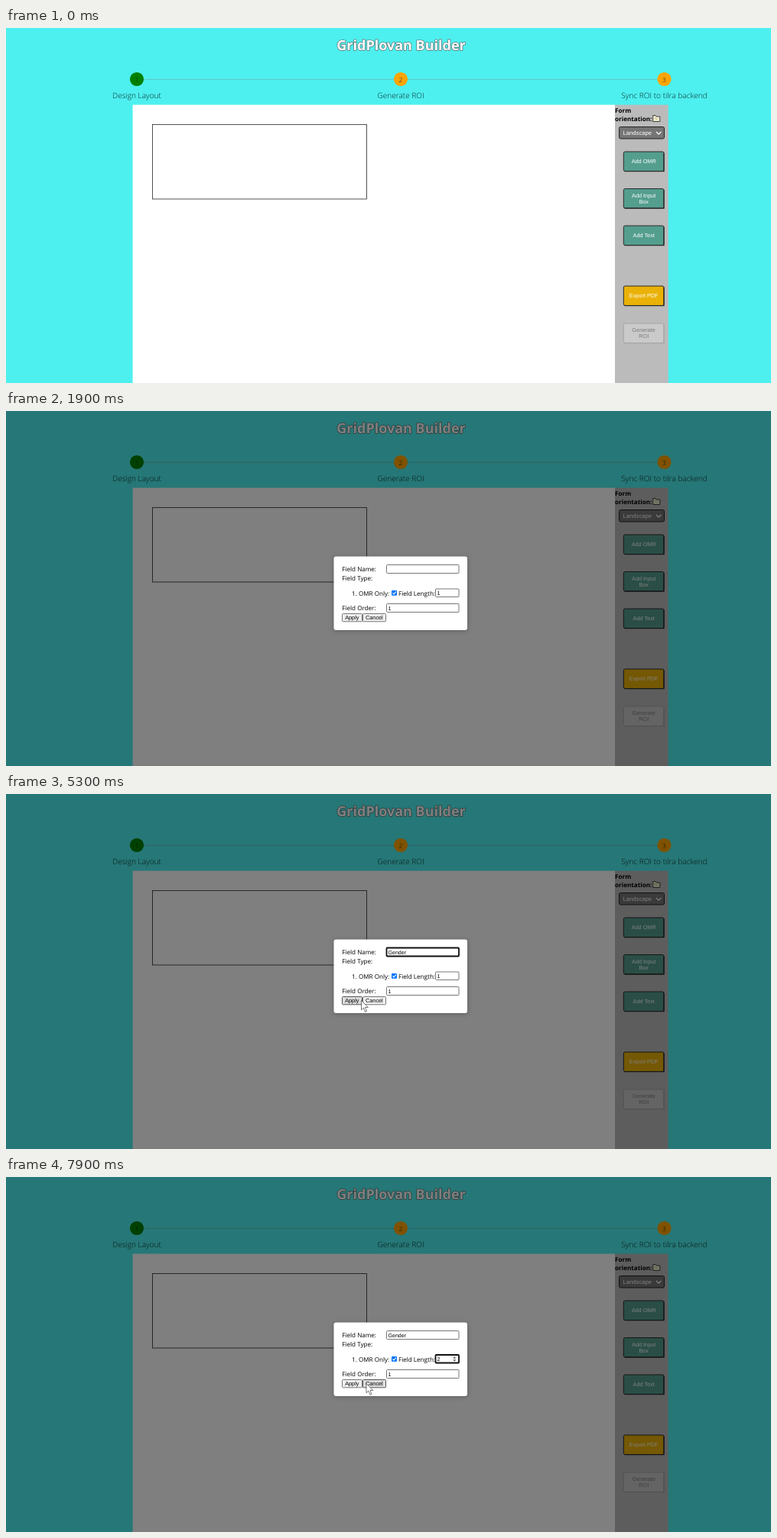
An HTML page for the animation above (8000 ms loop, 1000 by 465 pixels).

```html
<!DOCTYPE html>
<html lang="en">
<head>
<meta charset="utf-8">
<title>Form layout tool</title>
<style>
  html, body { margin: 0; width: 100%; height: 100%; overflow: hidden; background: #4df0ef; }
  svg { display: block; width: 1000px; height: 465px; }
  text { font: 8.2px "Open Sans", "Noto Sans", sans-serif; text-rendering: geometricPrecision; white-space: pre; }
  .mid text, text.mid { text-anchor: middle; }
  .title { font-size: 18px; font-weight: 700; fill: #fff; stroke: #5f7070; stroke-width: 1.5; paint-order: stroke; stroke-linejoin: round; }
  .step { font-size: 10.1px; font-weight: 300; fill: #0c2a2a; }
  .num { font-size: 8.5px; font-weight: 300; fill: #1c1c10; }
  .bold { font-size: 8.1px; font-weight: 700; }
  .ui text, text.ui { font: 7.3px "Liberation Sans", Arial, sans-serif; }
  .value { font-size: 7.05px !important; }
  .box { fill: #fff; stroke: #767676; }
  .box.on { stroke: #101010; stroke-width: 1.8; }
  .push { fill: #efefef; stroke: #767676; }
  .push.on { fill: #dcdcdc; stroke: #555; }
</style>
</head>
<body>
<svg viewBox="0 0 1000 465">
  <rect width="1000" height="465" fill="#4df0ef"/>
  <text class="title mid" x="516.5" y="29">GridPlovan Builder</text>
  <path d="M180 67.3H507M525 67.3H851" stroke="#62c4c3"/>
  <g id="steps" class="mid"></g>

  <rect x="165.6" y="100.6" width="630.4" height="365" fill="#fff"/>
  <rect x="191.5" y="126.5" width="280" height="97.5" fill="none" stroke="#333" stroke-width=".85"/>
  <rect x="796" y="100.6" width="69.7" height="365" fill="#bbb"/>
  <text class="bold" x="796" y="110.5">Form</text>
  <text class="bold" x="796" y="121.7">orientation:</text>
  <path d="M845.7 122.5V114.5H849L850 116H854.8V122.5Z" fill="#ece9d2" stroke="#333" stroke-width=".9"/>
  <path d="M848.5 117.5L851 120" stroke="#c9b85a"/>
  <rect x="801.5" y="129.5" width="59" height="15.5" rx="2" fill="#757575" stroke="#222"/>
  <text class="ui" x="806.5" y="140" fill="#fff" style="font-size:7.7px">Landscape</text>
  <path d="M850 136L853.2 139.2L856.4 136" fill="none" stroke="#fff" stroke-width="1.3"/>
  <g id="tools" class="ui mid"></g>

  <g id="modal" class="ui">
    <rect width="1000" height="465" fill="#000" opacity=".5"/>
    <rect x="428.5" y="190.5" width="174.5" height="96.5" rx="3" fill="#fff" style="filter:drop-shadow(0 1px 3px #0004)"/>
    <g id="labels"></g>
    <rect id="name" class="box" x="497.5" y="201.5" width="94.5" height="11" rx="1"/>
    <rect id="len" class="box" x="561.5" y="233" width="30.5" height="10.5" rx="1"/>
    <rect class="box" x="497.5" y="252.5" width="94.5" height="11" rx="1"/>
    <rect id="check" x="504" y="235" width="7" height="6.7" rx="1" fill="#0075ff"/>
    <path d="M505.4 238.4L507 240L509.8 236.6" fill="none" stroke="#fff" stroke-width="1.1"/>
    <text id="typed" class="value" x="499.5" y="209.6"></text>
    <rect id="caret" y="203" width="1" height="8"/>
    <text id="count" class="value" x="563.5" y="240.9">1</text>
    <text class="value" x="499.5" y="260.6">1</text>
    <g id="spinLen">
      <rect id="spinBack" x="582.5" y="234.5" width="7.5" height="7.5" fill="#c4c4c4"/>
      <path d="M584.3 237.5L586.3 235.3L588.3 237.5ZM584.3 239.3L586.3 241.5L588.3 239.3Z" fill="#505050"/>
    </g>
    <path id="spinOrder" d="M584.3 257.2L586.3 255L588.3 257.2ZM584.3 259L586.3 261.2L588.3 259Z" fill="#505050"/>
    <rect id="apply" class="push" x="439.5" y="265.5" width="26" height="10.3" rx="1"/>
    <rect id="cancel" class="push" x="466.5" y="265.5" width="30" height="10.3" rx="1"/>
    <text class="mid" x="452.3" y="273.2">Apply</text>
    <text class="mid" x="481.4" y="273.2">Cancel</text>
  </g>

  <path id="arrow" d="M0 0V12.3L2.9 9.7L5 14.8L7 14L4.9 9H8.8Z" fill="#fff" stroke="#555" stroke-width=".8"/>
  <path id="hand" d="M-1 1.2C-1 -.4 1.6 -.4 1.6 1.2V6L3 5.6L4.2 6.3L5.6 6.1L6.6 7L7.6 7.2V11.5L6 16.6H-1.6L-5.8 10.4C-6.2 8.9 -4.4 8.2 -3.4 9.2L-1 11Z" fill="#fff" stroke="#666" stroke-width=".5"/>
</svg>
<script>
const $ = id => document.getElementById(id);
const show = (id, on) => $(id).style.display = on ? "" : "none";
const between = (t, a, b) => t >= a && t < b;

$("steps").innerHTML = [
  [171, "green", "Design Layout"],
  [516, "orange", "Generate ROI"],
  [860.5, "orange", "Sync ROI to tilra backend"]
].map(([x, color, label], i) => `<circle cx="${x}" cy="67" r="9.1" fill="${color}"/>
  <text class="num" x="${x}" y="71">${i + 1}</text>
  <text class="step" x="${x}" y="92.4">${label}</text>`).join("");

const teal = "#549e8e";
$("tools").innerHTML = [
  [162, teal, "Add OMR"],
  [210.5, teal, "Add Input", "Box"],
  [259, teal, "Add Text"],
  [338, "#eab208", "Export PDF"],
  [387, "#cacaca", "Generate", "ROI"]
].map(([y, fill, ...lines]) => {
  const off = lines[0] === "Generate";
  const edge = off ? "#a6a6a6" : "#2a2a2a";
  const text = lines.map((s, i) =>
    `<text x="833.7" y="${y + 15.1 + (i - (lines.length - 1) / 2) * 8}" fill="${off ? "#7c7c7c" : "#fff"}">${s}</text>`);
  return `<rect x="807.3" y="${y}" width="52.7" height="25.5" rx="2" fill="${fill}" stroke="${edge}"/>
    <path d="M808.5 ${y + 25.6}H860V${y + 1.5}" fill="none" stroke="${edge}" stroke-width="1.3"/>` + text.join("");
}).join("");

$("labels").innerHTML = [
  [439.3, 210, "Field Name:"], [439.3, 221.6, "Field Type:"],
  [452, 241.5, "1."], [461, 241.5, "OMR Only:"], [513, 241.5, "Field Length:"],
  [439.3, 261.4, "Field Order:"]
].map(([x, y, s]) => `<text x="${x}" y="${y}" style="font:8.1px 'Open Sans','Noto Sans',sans-serif">${s}</text>`).join("");

// Each pointer trip is a list of [time, x, y]; it is hidden outside its trip.
const trips = [
  [[300, 765, 440], [700, 815, 250], [1000, 843.5, 169.5], [1200, 843.5, 169.5], [1500, 640, 205], [1800, 475.5, 226], [1900, 475.5, 226]],
  [[5200, 500, 267], [5300, 464.5, 270.5], [5500, 456, 273], [5900, 456, 273], [6000, 478, 268], [6100, 478, 268]],
  [[6500, 512, 237], [6800, 591, 237.5], [6900, 585.5, 236], [7600, 585.5, 236], [7700, 545, 248], [7900, 471, 270.5], [8000, 471, 270.5]]
];
const keys = [3400, 3700, 3900, 4100, 4400, 4500];

function pointer(t) {
  const trip = trips.find(p => between(t, p[0][0], p[p.length - 1][0]));
  if (!trip) return null;
  const i = trip.findIndex(p => p[0] > t);
  const [t0, x0, y0] = trip[i - 1], [t1, x1, y1] = trip[i];
  const k = (t - t0) / (t1 - t0);
  return [x0 + (x1 - x0) * k, y0 + (y1 - y0) * k];
}

function draw(t) {
  show("modal", t >= 1100);
  $("typed").textContent = "Gender".slice(0, keys.filter(k => k <= t).length);
  $("name").classList.toggle("on", between(t, 2300, 7100));
  $("len").classList.toggle("on", t >= 7100);
  $("count").textContent = t < 7200 ? "1" : "2";

  const blink = t < 5100 || Math.floor((t - 5100) / 500) % 2 === 1;
  show("caret", between(t, 2300, 2800) || between(t, 3400, 7100) && blink);
  if (t >= 1100) $("caret").setAttribute("x", 499.7 + $("typed").getComputedTextLength());

  show("spinLen", t >= 6800);
  show("spinBack", between(t, 6800, 7700));
  show("spinOrder", between(t, 5100, 5200) || between(t, 6100, 6200));
  $("check").setAttribute("fill", between(t, 6500, 6600) ? "#005cc8" : "#0075ff");
  $("apply").classList.toggle("on", between(t, 5300, 6000));
  $("cancel").classList.toggle("on", between(t, 6000, 6100) || t >= 7900);

  const p = pointer(t), hand = between(t, 900, 1300);
  show("hand", p && hand);
  show("arrow", p && !hand);
  if (p) $(hand ? "hand" : "arrow").setAttribute("transform", `translate(${p})`);
}

function frame(now) {
  draw(Math.floor(now % 8000 / 100) * 100);
  requestAnimationFrame(frame);
}
draw(0);
requestAnimationFrame(frame);
</script>
</body>
</html>
```
